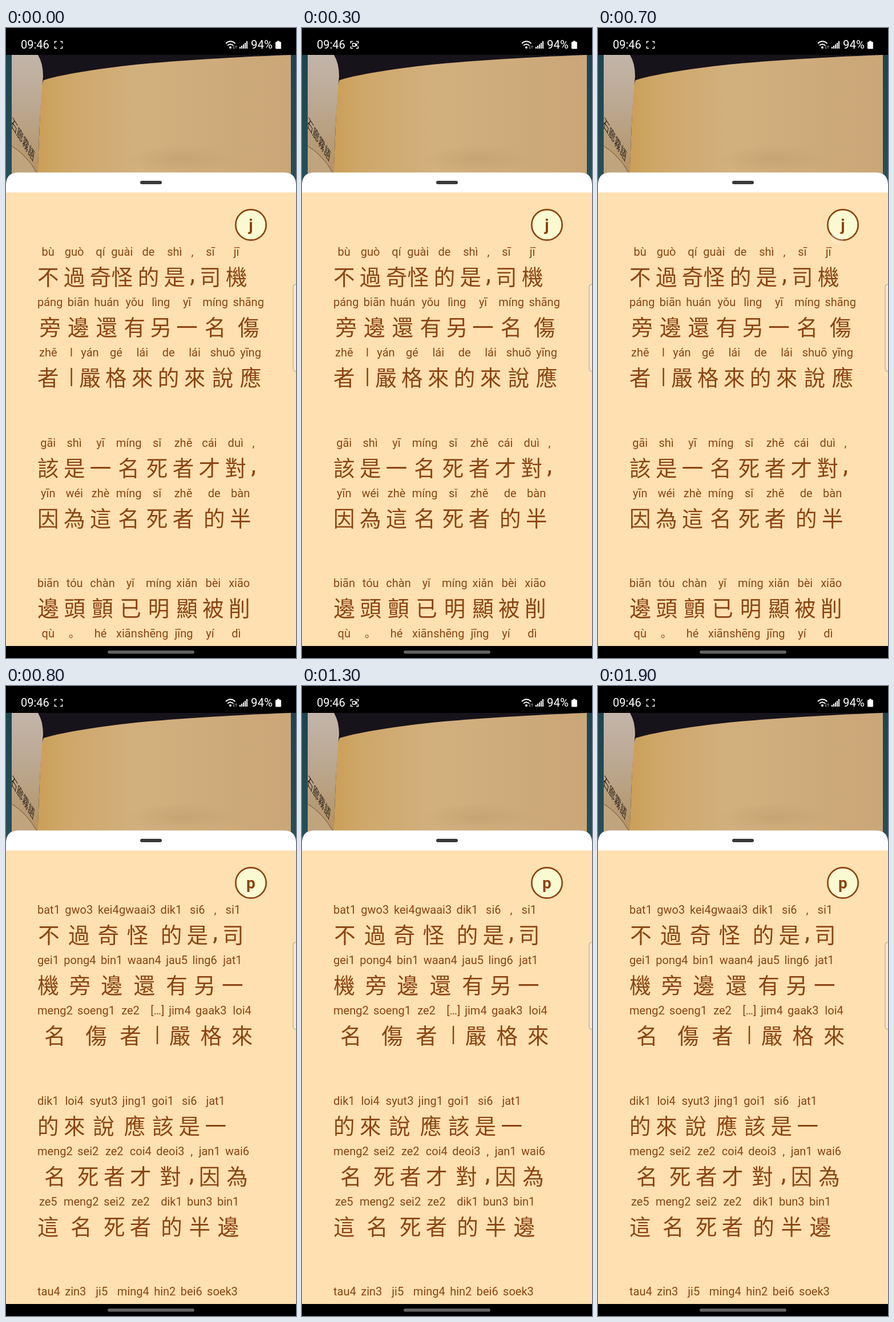
Recreate the animation shown at these times as an HTML page. Size 508 by 1101 pixels, loop 2 s.

```html
<!DOCTYPE html>
<html lang="zh">
<head>
<meta charset="utf-8">
<title>Reading aid</title>
<style>
  html, body { margin: 0; width: 100%; height: 100%; overflow: hidden; background: #000; }
  .stage { position: relative; width: 508px; height: 1101px; overflow: hidden; background: #000; }
  .stage > svg { position: absolute; left: 0; top: 0; }
  svg text, .row { font-family: Roboto, sans-serif; }
  .title { font: 500 20px "Noto Sans CJK SC", "Noto Sans CJK", sans-serif !important; }

  .page { position: absolute; inset: 0; height: 1080px; overflow: hidden; color: #8b4513; }
  .row { position: absolute; left: 55px; display: flex; white-space: nowrap; }
  .word { display: flex; margin-right: 8.4px; }
  .cell { min-width: 37.5px; text-align: center; }
  .cell.comma { min-width: 25px; width: 25px; }
  .cell.bar { min-width: 27.3px; }
  .cell.wide { min-width: 40px; }
  .sound { height: 24px; font-size: 20px; line-height: 24px; }
  .sign { height: 55px; margin-top: 2px; line-height: 55px;
    font-size: 37.5px; font-family: "Noto Sans CJK SC", "Noto Sans CJK", sans-serif; }
  .comma .sign { font: 44px/48px Roboto, sans-serif; }
  .bar .sign { font: 300 43px/61px Roboto, sans-serif; }

  .mandarin { animation: first 2s step-end infinite; }
  .cantonese { animation: second 2s step-end infinite; }
  .camera { animation: blink 1s step-end infinite; }
  .touch { animation: tap 2s step-end infinite; }
  @keyframes first { 0% { visibility: visible } 40%, 100% { visibility: hidden } }
  @keyframes second { 0% { visibility: hidden } 40%, 100% { visibility: visible } }
  @keyframes blink { 0% { opacity: 0 } 10% { opacity: 1 } 60%, 100% { opacity: 0 } }
  @keyframes tap { 0% { opacity: 0 } 35% { opacity: .22 } 40%, 100% { opacity: 0 } }
</style>
</head>
<body>
<div class="stage">
  <svg width="508" height="1101" viewBox="0 0 508 1101">
    <defs>
      <linearGradient id="paper">
        <stop offset="0" stop-color="#cb9f58"/>
        <stop offset=".12" stop-color="#cea76a"/>
        <stop offset=".4" stop-color="#d2b07e"/>
        <stop offset="1" stop-color="#caa678"/>
      </linearGradient>
      <linearGradient id="leaf" x2="0" y2="1">
        <stop offset="0" stop-color="#c2b5aa"/>
        <stop offset=".4" stop-color="#bba78f"/>
        <stop offset="1" stop-color="#b18b53"/>
      </linearGradient>
      <linearGradient id="teal" x2="0" y2="1">
        <stop offset="0" stop-color="#1d4450"/>
        <stop offset="1" stop-color="#28515b"/>
      </linearGradient>
      <radialGradient id="smudge">
        <stop offset="0" stop-color="#8d6a3c" stop-opacity=".14"/>
        <stop offset="1" stop-color="#8d6a3c" stop-opacity="0"/>
      </radialGradient>
      <clipPath id="photo"><path d="M10 47H499V290H10Z"/></clipPath>
    </defs>

    <path d="M0 47H508V290H0Z" fill="url(#teal)"/>
    <g clip-path="url(#photo)">
      <path d="M10 47H499V290H10Z" fill="#17131a"/>
      <path d="M54 290L61 120Q62 98 66 91C105 79 190 67 260 61S420 50 499 47V290Z" fill="url(#paper)"/>
      <ellipse cx="305" cy="229" rx="95" ry="24" fill="url(#smudge)"/>
      <path d="M10 47H56Q65 62 65 84Q58 150 55 290H10Z" fill="url(#leaf)"/>
      <path d="M10 206Q36 222 54 253L10 262Z" fill="#c3aa86" opacity=".75"/>
      <path d="M10 206Q36 222 54 253" fill="none" stroke="#6b5435" stroke-width="1"/>
      <text class="title" transform="matrix(.5 .8 -.2 1 8 170)" fill="#2a2119">石廊霧語</text>
    </g>

    <path d="M0 300V274.500Q0 252.500 22 252.500H486Q508 252.500 508 274.500V300Z" fill="#fff"/>
    <rect x="235" y="267" width="38" height="6" rx="3" fill="#393939"/>
    <path d="M0 287.5H508V1080H0Z" fill="#ffe0b0"/>

    <g fill="#fff">
      <text x="26" y="36" font-size="20">09:46</text>
      <text x="429" y="36" font-size="20.5">94%</text>
      <path d="M475 22.5H479V24H480.5Q482 24 482 25.5V35Q482 36.5 480.5 36.5H473.5Q472 36.5 472 35V25.5Q472 24 473.5 24H475Z"/>
      <path d="M409 33h2v3h-2zM412 31h2v5h-2zM415 28.500h2v7.500h-2zM418 26h2v10h-2zM421 23h2v13h-2z"/>
      <circle cx="393" cy="34" r="2"/>
    </g>
    <g fill="none" stroke="#fff" stroke-width="1.8">
      <path d="M385 27Q393 19.500 401.500 27M388 30.500Q393 26 398 30.500"/>
      <path d="M399 30v6m-1.500-1.500l1.500 1.500 1.500-1.500M403 36v-5m-1.500 1.500l1.500-1.500 1.500 1.500" stroke="#aaa" stroke-width="1"/>
      <path d="M85.500 27V23.500H89M95 23.500H98.500V27M98.500 32V35.500H95M89 35.500H85.500V32" stroke-width="1.5"/>
      <path class="camera" d="M88.500 27H93.500V32H88.500ZM93.500 29.500L96 27.500V31.500Z" stroke-width="1.300"/>
    </g>

    <rect x="503" y="448" width="20" height="152" rx="5" fill="#fbead0" stroke="#c9b491" stroke-width="1.500"/>
    <circle cx="429" cy="344" r="26.700" fill="#fafad2" stroke="#8b4513" stroke-width="2.700"/>
    <g fill="#8b4513" font-size="28" font-weight="700" text-anchor="middle">
      <text class="mandarin" x="429" y="354">j</text>
      <text class="cantonese" x="429" y="354">p</text>
    </g>
    <circle class="touch" cx="419" cy="367" r="11" fill="#fff"/>
    <rect x="178" y="1088" width="152" height="5.500" rx="2.750" fill="#626262"/>
  </svg>
  <div class="page mandarin"></div>
  <div class="page cantonese"></div>
</div>

<script>
// A space separates words, "+" joins cells, a double space widens the gap;
// the last character of each cell is the large sign.
const pages = {
  mandarin: [
    [379, 'bù不 guò過 qí奇+guài怪 de的 shì是+,,+sī司 jī機'],
    [467, 'páng旁 biān邊 huán還 yǒu有 lìng另 yī一 míng名 shāng傷'],
    [555, 'zhě者 ll+yán嚴 gé格 lái來 de的 lái來 shuō說 yīng應'],
    [713, 'gāi該 shì是 yī一 míng名 sǐ死 zhě者 cái才 duì對+,,'],
    [801, 'yīn因 wéi為 zhè這 míng名 sǐ死 zhě者  de的 bàn半'],
    [958, 'biān邊 tóu頭 chàn顫 yǐ已 míng明 xiǎn顯 bèi被 xiāo削'],
    [1046, 'qù去 。。 hé何 xiān先+shēng生 jīng經 yí移 dì地']
  ],
  cantonese: [
    [379, 'bat1不 gwo3過 kei4奇+gwaai3怪 dik1的 si6是+,,+si1司'],
    [467, 'gei1機 pong4旁 bin1邊 waan4還 jau5有 ling6另 jat1一'],
    [555, 'meng2名 soeng1傷 ze2者 […]l+jim4嚴 gaak3格 loi4來'],
    [713, 'dik1的 loi4來 syut3說 jing1應 goi1該 si6是 jat1一'],
    [801, 'meng2名 sei2死 ze2者 coi4才 deoi3對+,,+jan1因 wai6為'],
    [889, 'ze5這 meng2名 sei2死 ze2者  dik1的 bun3半 bin1邊'],
    [1046, 'tau4頭 zin3顫 ji5已 ming4明 hin2顯 bei6被 soek3削']
  ]
};

function add(parent, className, text = '') {
  const node = document.createElement('div');
  node.className = className;
  node.textContent = text;
  return parent.appendChild(node);
}

function cellClass(sound, sign) {
  if (sign === ',') return 'cell comma';
  if (sign === 'l') return sound === 'l' ? 'cell bar' : 'cell bar wide';
  return 'cell';
}

for (const [name, rows] of Object.entries(pages)) {
  const page = document.querySelector('.page.' + name);
  for (const [top, line] of rows) {
    const row = add(page, 'row');
    row.style.top = top + 'px';
    for (const item of line.split(' ')) {
      const word = add(row, 'word');
      for (const part of item ? item.split('+') : []) {
        const sound = part.slice(0, -1), sign = part.slice(-1);
        const cell = add(word, cellClass(sound, sign));
        add(cell, 'sound', sound);
        add(cell, 'sign', sign);
      }
    }
  }
}
</script>
</body>
</html>
```
